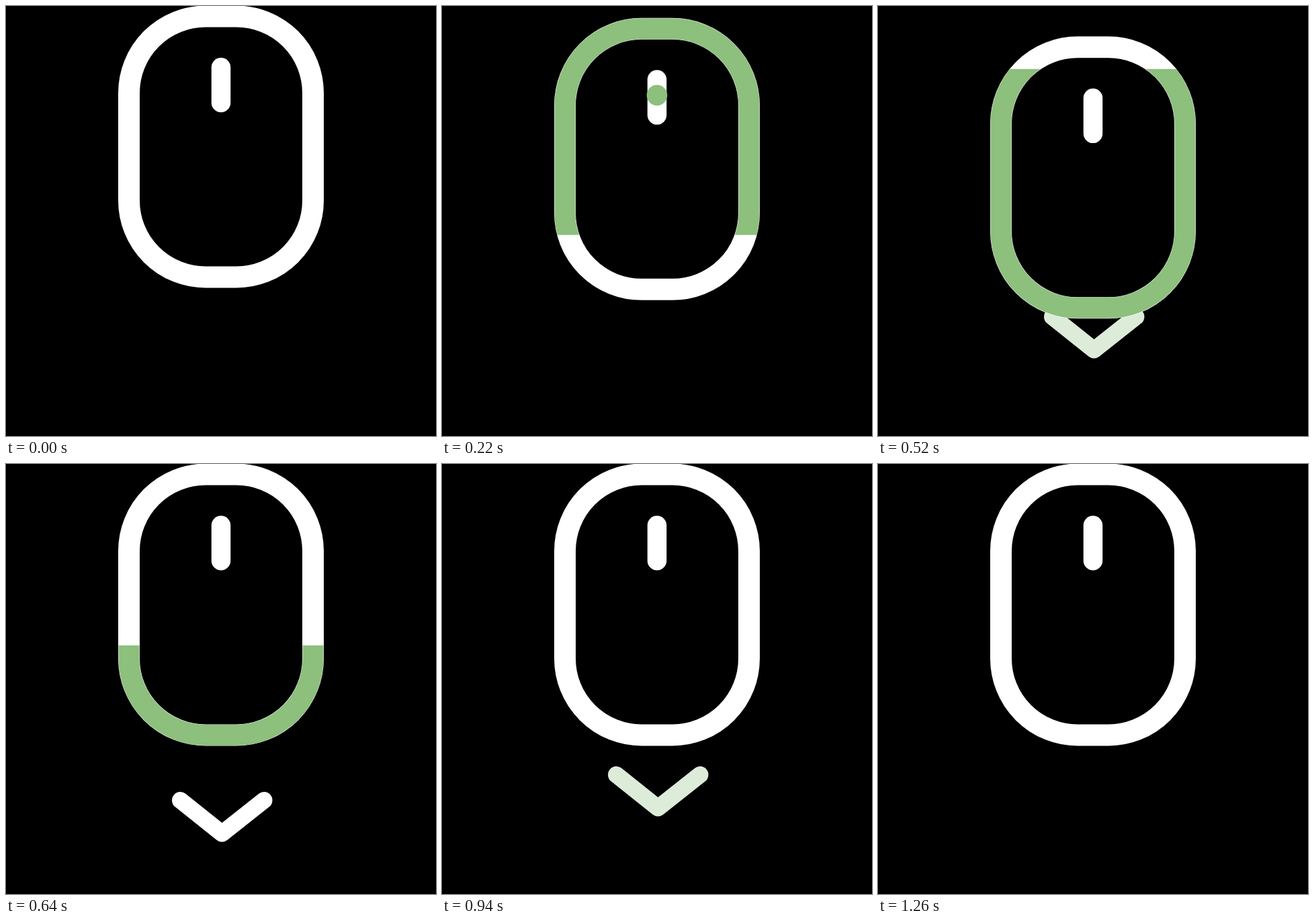
These frames come from a looping animation (640x640 px, 1400 ms). An HTML page with a canvas:

```html
<!DOCTYPE html>
<html>
<head>
<meta charset="utf-8">
<style>
  html, body { margin: 0; height: 100%; overflow: hidden; background: #000; }
  canvas { display: block; }
</style>
</head>
<body>
<canvas id="stage" width="640" height="640"></canvas>
<script>
const ctx = document.getElementById('stage').getContext('2d');
const LOOP = 1400;
const GREEN = [141, 191, 125];
// Moments (ms) at which the pose advances by one step
const TICKS = [
  60, 120, 160, 220, 240, 280, 300, 340, 360, 400, 420, 480,
  520, 540, 580, 600, 640, 700, 720, 760, 780, 820, 860, 900,
  940, 960, 1000, 1040, 1080, 1120, 1140, 1180, 1220, 1260
];

const clamp = (v, lo, hi) => Math.min(hi, Math.max(lo, v));

// White at 0, green at 1
const tint = amount =>
  `rgb(${GREEN.map(c => Math.round(255 + (c - 255) * amount))})`;

function stroke(width, color, trace) {
  ctx.lineWidth = width;
  ctx.strokeStyle = color;
  ctx.beginPath();
  trace();
  ctx.stroke();
}

function clipped(x, y, w, h, draw) {
  ctx.save();
  ctx.beginPath();
  ctx.rect(x, y, w, h);
  ctx.clip();
  draw();
  ctx.restore();
}

function chevron(phase) {
  const y = 443.5 + 9.5 * phase;
  stroke(25, tint(clamp(0.6 - 0.15 * phase, 0, 1)), () => {
    ctx.moveTo(259.5, y);
    ctx.lineTo(321.5, y + 49.5);
    ctx.lineTo(384, y);
  });
}

const ring = (width, color) =>
  stroke(width, color, () => ctx.roundRect(183, 15.5, 274, 388, 114));

function dot(y, color) {
  ctx.fillStyle = color;
  ctx.beginPath();
  ctx.arc(320, y, 15.3, 0, Math.PI * 2);
  ctx.fill();
}

function mouse(step) {
  const drop = step <= 13 ? Math.min(step, 10) / 10 : clamp((17 - step) / 4, 0, 1);
  ctx.save();
  ctx.translate(0, 45.8 * drop);

  ring(32, '#fff');
  const greenEnd = clamp(80.6 * step, 0, 425);
  const greenStart = clamp(48 + 55.5 * (step - 13), -5, 425);
  if (greenEnd > greenStart && step > 0) {
    clipped(160, greenStart, 320, greenEnd - greenStart, () => ring(31, tint(1)));
  }

  stroke(28.5, '#fff', () => {
    ctx.moveTo(320, 91.3);
    ctx.lineTo(320, 144);
  });
  if (step >= 1 && step <= 10) {
    const y = 92.2 + 5.58 * step;
    const strength = clamp((11.3 - step) / 4, 0, 1);
    if (strength < 1) {
      dot(y, '#fff');
      clipped(300, 70, 40, 88, () => dot(y - (1 - strength) * 3, tint(strength)));
    } else {
      dot(y, tint(1));
    }
  }
  ctx.restore();
}

function frame(now) {
  const time = now % LOOP;
  const step = TICKS.filter(t => t <= time).length;
  ctx.clearRect(0, 0, 640, 640);
  ctx.lineCap = ctx.lineJoin = 'round';
  const phase = (step - 11) % 12;
  if (step >= 11 && step < 34 && phase <= 10) chevron(phase);
  mouse(step);
}

const start = performance.now();
function loop() {
  frame(performance.now() - start);
  requestAnimationFrame(loop);
}
loop();
</script>
</body>
</html>
```
